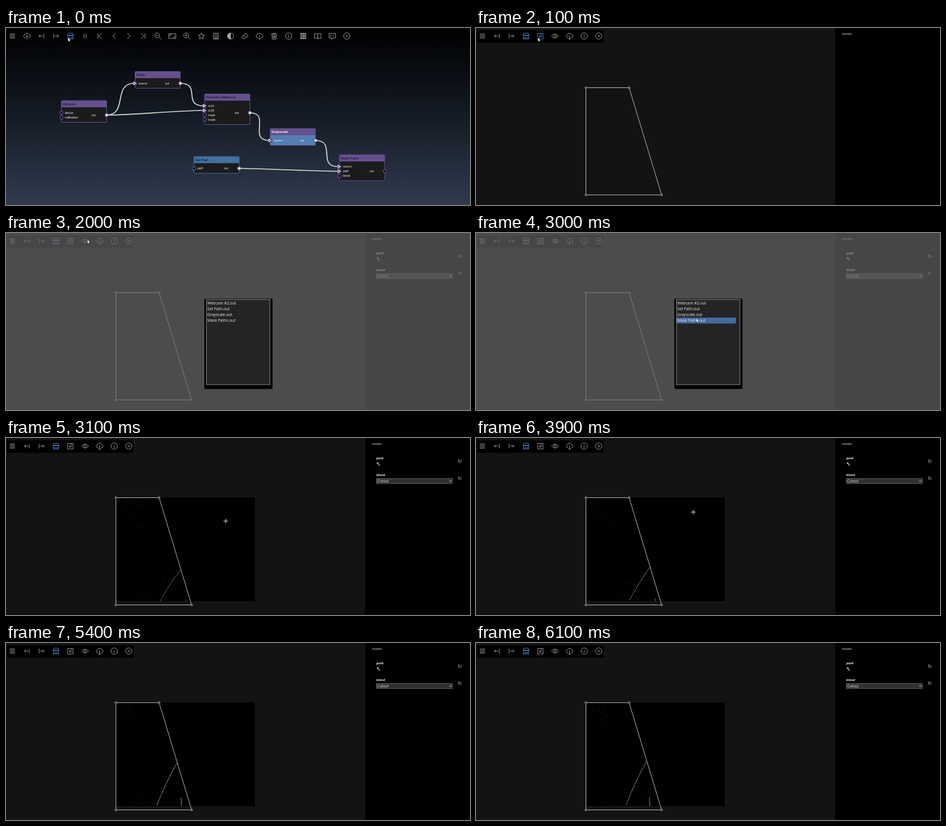
Animation, 800 px wide and 307 px high, one loop 6200 ms. Source, as an HTML page:

```html
<!DOCTYPE html>
<html lang="en">
<head>
<meta charset="utf-8">
<title>Node editor mask</title>
<style>
  html, body { margin: 0; width: 100%; height: 100%; overflow: hidden; background: #000; }
  svg { display: block; width: 800px; height: 307px; }
  text { font-family: "Open Sans", sans-serif; fill: #eee; }
  .node text { font-family: "Liberation Sans", Arial, sans-serif; font-size: 5px; fill: #f4f4f4; }
  .node .title { font-size: 6px; fill: #0c0a12; }
  .node .picked { fill: #fff; font-weight: bold; }
  .icon { fill: none; stroke: #a8a8a8; stroke-width: .9; stroke-linejoin: round; }
  .icon.on { stroke: #5f8fd8; }
  .label { font-size: 5.6px; font-weight: bold; font-style: italic; }
  .list text { font-size: 6.8px; }
</style>
</head>
<body>
<svg id="stage" viewBox="0 0 800 307"></svg>
<script>
const LOOP = 6200, STEP = 100;
const OPEN = 100, PANEL = 200, DIALOG = 2000, PICK = 2900, PREVIEW = 3100;
const PURPLE = '#65508f', BLUE = '#41709f';

const circle = r => `M${-r} 0a${r} ${r} 0 1 0 ${2 * r} 0a${r} ${r} 0 1 0 ${-2 * r} 0z`;
const cloud = 'M-2.5 3H-3.5A2.6 2.6 0 0 1 -4 -2A4 4 0 0 1 3.6 -2.2A2.7 2.7 0 0 1 4 3H2.5';
const glass = 'M2.2 1.8L6 5.5M3-1.2a4.2 4.2 0 1 0 -8.4 0a4.2 4.2 0 1 0 8.4 0z';

const icons = {
  menu: 'M-4.5-3.6H4.5M-4.5-1.2H4.5M-4.5 1.2H4.5M-4.5 3.6H4.5',
  upload: cloud + 'M0 6V-1M-2 1L0-1L2 1',
  download: cloud + 'M0-1V6M-2 4L0 6L2 4',
  input: 'M4-4V4M2 0H-4.5M-2-2.3L-4.5 0L-2 2.3',
  output: 'M-4-4V4M-2 0H4.5M2-2.3L4.5 0L2 2.3',
  store: 'M-3.5-5H3.5L5.3-1.4H-5.3zM-5.3-1.4q1.3 2.4 2.65 0q1.3 2.4 2.65 0q1.3 2.4 2.65 0q1.3 2.4 2.65 0M-4.5 .5V5H4.5V.5M-4.5 3H4.5',
  edit: 'M2-4.5H-5V5H4.5V-1M-2 2L-1.3-.5L4-5.3L5.5-3.8L.4 1.4zM-1.3-.5L.4 1.4',
  eye: 'M-6 0Q0-7 6 0Q0 7-6 0z' + circle(2),
  pause: 'M-1.8-4V4M1.8-4V4',
  first: 'M-3-4.5V4.5M3.5-4.5L-1 0L3.5 4.5',
  prev: 'M2.3-4.8L-2.5 0L2.3 4.8',
  next: 'M-2.3-4.8L2.5 0L-2.3 4.8',
  last: 'M3-4.5V4.5M-3.5-4.5L1 0L-3.5 4.5',
  zoomOut: glass + 'M-3.4-1.2H1',
  ratio: 'M-6-4.2H6V4.2H-6zM-4 0V-2.5H-1.5M4 0V2.5H1.5',
  zoomIn: glass + 'M-3.4-1.2H1M-1.2-3.4V1',
  star: 'M0-5.5L1.6-1.8L5.6-1.6L2.5 1L3.5 5L0 2.8L-3.5 5L-2.5 1L-5.6-1.6L-1.6-1.8z',
  calc: 'M-4-5H4V5.2H-4zM-2.5-3H2.5M-2.5 0H-1M-.7 0H.7M1 0H2.5M-2.5 2H-1M-.7 2H.7M1 2H2.5M-2.5 3.8H2.5',
  contrast: circle(5.3) + 'M0-5V5',
  eraser: 'M-5.5 1L1-4.5L5.5-.5L-.5 4.5H-3.5zM-2.5-1.5L2 2.5',
  trash: 'M-5-3.4H5M-1.8-3.4V-5H1.8V-3.4M-3.8-3.4L-3.2 5.3H3.2L3.8-3.4M-1.5-1.5V3.5M0-1.5V3.5M1.5-1.5V3.5',
  info: circle(5.5) + 'M0-.8V3M0-3V-2',
  grid: 'M-5-3.7H-2M-1.5-3.7H1.5M2-3.7H5M-5 0H-2M-1.5 0H1.5M2 0H5M-5 3.7H-2M-1.5 3.7H1.5M2 3.7H5',
  book: 'M0-3.5Q-3-5-5.7-4V4Q-3 3.2 0 4.7Q3 3.2 5.7 4V-4Q3-5 0-3.5V4.7',
  quote: 'M-5.5-4.5H5.5V3H1.5L-1 5.5V3H-5.5zM-2.4-2.3V0L-3.2 1M1.6-2.3V0L.8 1',
  close: circle(5.5) + 'M-2.3-2.3L2.3 2.3M2.3-2.3L-2.3 2.3'
};

const toolbar = names => names.split(' ').map((name, i) =>
  `<path class="icon" data-name="${name}" transform="translate(${11 + i * 25.07} 14)" d="${icons[name]}"` +
  (name === 'grid' ? ' style="stroke-width:2.6"' : '') + '/>' +
  (name === 'contrast' ? `<path fill="#a8a8a8" d="M${11 + i * 25.07} 8.7a5.3 5.3 0 0 0 0 10.6z"/>` : '')
).join('');

const text = (x, y, s, attrs = '') => `<text x="${x}" y="${y}" ${attrs}>${s}</text>`;

// Inputs prefixed with ">" are wired.
function node({ x, y, h, title, ins, outY, wired = true, color = PURPLE, picked }) {
  const port = (px, py) =>
    `<circle cx="${px}" cy="${py}" r="2.8" fill="#101014" stroke="${color}" stroke-width="1.1"/>`;
  const inputs = ins.map(([label, dy]) => {
    const on = label[0] === '>', py = y + dy;
    return port(x, py) +
      (on ? `<path d="M${x - 3} ${py - 2.6}L${x + 1.2} ${py}L${x - 3} ${py + 2.6}" fill="none" stroke="#eee" stroke-width="1.3"/>` : '') +
      text(x + 6, py + 1.8, on ? label.slice(1) : label);
  }).join('');
  return `<g class="node">
    <rect x="${x}" y="${y}" width="78" height="${h}" rx="1.5" fill="${picked ? '#527fb0' : '#1b1b1c'}" stroke="${color}"/>
    <rect x="${x}" y="${y}" width="78" height="11.5" fill="${color}"/>
    ${text(x + 2, y + 7.8, title, `class="title ${picked ? 'picked' : ''}"`)}
    ${inputs}
    ${text(x + 52, y + outY + 1.8, 'out')}
    ${port(x + 78, y + outY)}
    ${wired ? `<circle cx="${x + 78}" cy="${y + outY}" r="2.2" fill="#e8e8f0"/>` : ''}
  </g>`;
}

const nodes = [
  { x: 95.5, y: 126, h: 37.5, title: 'Webcam', ins: [['device', 21], ['calibration', 29]], outY: 25 },
  { x: 222.5, y: 75.5, h: 29, title: 'Delay', ins: [['>source', 20.5]], outY: 20.5 },
  { x: 342.5, y: 114.5, h: 53, title: 'Absolute Difference',
    ins: [['>srcA', 20.5], ['>srcB', 28.5], ['mask', 36.5], ['mode', 44.5]], outY: 32.5 },
  { x: 455.5, y: 174.5, h: 29, title: 'Grayscale', ins: [['>source', 20.5]], outY: 20.5, picked: true },
  { x: 324, y: 223, h: 29, title: 'Set Path', ins: [['path', 20.5]], outY: 20.5, color: BLUE },
  { x: 575, y: 220, h: 45, title: 'Mask Paths',
    ins: [['>source', 20.5], ['>path', 28.5], ['blend', 36.5]], outY: 28.5, wired: false }
];

const wire = ([x1, y1, x2, y2]) =>
  `<path d="M${x1} ${y1}C${x1 + 38} ${y1} ${x2 - 38} ${y2} ${x2} ${y2}"/>`;
const wires = [
  [173, 151, 221, 96], [173, 151, 341, 143], [300, 96, 341, 135],
  [420, 147, 454, 195], [533, 195, 573, 240.5], [402, 243.5, 573, 248.5]
];

const corners = [[189.5, 103.5], [264, 103.5], [320, 289.5], [189.5, 289.5]];
const points = corners.join(' ');
const reset = y =>
  `<path d="M781 ${y - 1.6}A2.3 2.3 0 1 0 783.6 ${y - 1.7}M780.3 ${y - 2.6}L781 ${y - 1.2}L782.6 ${y - 1.7}" fill="none" stroke="#ddd" stroke-width=".8"/>`;
const choices = ['Webcam #2.out', 'Set Path.out', 'Grayscale.out', 'Mask Paths.out'];

const stage = document.getElementById('stage');
stage.innerHTML = `
<defs>
  <linearGradient id="sky" x2="0" y2="1">
    <stop offset=".04" stop-color="#010203"/><stop offset=".5" stop-color="#151b25"/><stop offset="1" stop-color="#2f3b4e"/>
  </linearGradient>
  <clipPath id="mask"><polygon points="${points}"/></clipPath>
</defs>
<g id="graph">
  <rect width="800" height="307" fill="url(#sky)"/>
  <g id="graphBar">${toolbar('menu upload input output store pause first prev next last zoomOut ratio zoomIn star calc contrast eraser download trash info grid book quote close')}</g>
  ${nodes.map(node).join('')}
  <g fill="none" stroke="#dcdcdc" stroke-width="1.7">${wires.map(wire).join('')}</g>
</g>
<g id="editor">
  <rect width="800" height="307" fill="#131313"/>
  <g id="preview">
    <rect x="190" y="103" width="239" height="180" fill="#000"/>
    <g clip-path="url(#mask)" fill="none">
      <path id="grain" stroke="#10131b"/>
      <path id="edge" stroke-width="1.1"/>
      <path id="stub" stroke-width="1.4"/>
    </g>
  </g>
  <polygon points="${points}" fill="none" stroke="#b8b8b8"/>
  ${corners.map(([x, y]) => `<circle cx="${x}" cy="${y}" r="1.7" fill="#333" stroke="#b0b0b0" stroke-width=".9"/>`).join('')}
  <rect x="2" y="4" width="218" height="21.5" fill="#000"/>
  <g id="editBar">${toolbar('menu input output store edit eye download info close')}</g>
  <rect x="619.5" width="180.5" height="307" fill="#000"/>
  ${text(631, 11.5, 'masks', 'font-size="5.7"')}
  <g id="panel">
    ${text(638.5, 36.5, 'path', 'class="label"')}
    ${text(638.5, 66, 'blend', 'class="label"')}
    <path d="M639 43H642V47H645M640.5 43V45" fill="none" stroke="#ddd"/>
    ${reset(40)}${reset(69.5)}
    <rect x="638.5" y="70.5" width="131" height="8.5" fill="#303030" stroke="#777" stroke-width=".8"/>
    ${text(640, 77, 'Cutout', 'font-size="6.2"')}
    <path d="M764.3 73.8L766 75.6L767.7 73.8" fill="none" stroke="#eee"/>
  </g>
</g>
<g id="dialog" class="list">
  <rect width="800" height="307" fill="#646464" fill-opacity=".7"/>
  <rect x="342" y="114" width="117.5" height="156.5" rx="1.5" fill="#000"/>
  <rect x="345.5" y="115.5" width="109.5" height="147.5" fill="#242424" stroke="#999" stroke-width=".9"/>
  <rect id="choice" x="346" y="146.7" width="102" height="10.2" fill="#456a9f"/>
  ${choices.map((s, i) => text(347, 123.6 + i * 10.2, s)).join('')}
</g>
<path id="arrow" d="M0 0V6.2L1.4 5L2.4 7.2L3.4 6.8L2.5 4.6H4.3z" fill="#fff" stroke="#111" stroke-width=".3"/>
<path id="cross" d="M-4 0H4M0-4V4" stroke="#ddd" fill="none"/>`;

const el = {};
stage.querySelectorAll('[id]').forEach(e => el[e.id] = e);

// Rows are time followed by values.
const pointer = [
  [0, 107, 17], [100, 107, 17], [700, 158, 20], [1000, 168, 24], [1200, 160, 16],
  [1400, 160, 16], [1900, 140.5, 11.5], [2000, 140.5, 11.5], [2100, 152, 24],
  [2800, 380, 148], [3000, 380, 148], [3500, 374.5, 128.5], [5000, 374.5, 128.5], [5300, 384, -8]
];
// Edge top, middle and bottom, stub x and top, brightness.
const figure = [
  [3100, 301, 229, 284, 249, 266, 283, 310, 280, 85],
  [3900, 299.5, 224, 283, 248, 264, 282, 309, 278, 100],
  [5400, 295, 208, 276, 241, 260, 282, 302, 268, 125],
  [6100, 294, 206, 274, 240, 259, 281, 299, 268, 115]
];

function sample(rows, t) {
  const i = rows.findIndex(r => r[0] > t);
  if (i < 0) return rows[rows.length - 1].slice(1);
  if (i === 0) return rows[0].slice(1);
  const a = rows[i - 1], b = rows[i], k = (t - a[0]) / (b[0] - a[0]);
  return a.slice(1).map((v, n) => v + (b[n + 1] - v) * k);
}

function seeded(s) {
  return () => {
    s = Math.imul(s ^ s >>> 15, 0x2c1b3c6d) + 0x9e3779b9 | 0;
    return ((s ^ s >>> 13) >>> 0) / 4294967296;
  };
}

const show = (e, on) => e.style.display = on ? '' : 'none';

function drawFigure(t) {
  const rnd = seeded(t + 7);
  let dots = '';
  for (let i = 0; i < 130; i++) {
    const upper = i < 60, u = rnd(), v = rnd();
    const x = upper ? 196 + 42 * u : 220 + 80 * u;
    const y = upper ? 108 + 28 * v + 28 * u * v : 283 - (15 + 45 * u) * v;
    dots += `M${x.toFixed(1)} ${y.toFixed(1)}h1.6`;
  }
  el.grain.setAttribute('d', dots);

  const [x1, y1, x2, y2, x3, y3, sx, sy, tone] = sample(figure, t);
  const gray = Math.round(tone);
  el.edge.setAttribute('d', `M${x1} ${y1}Q${x2} ${y2} ${x3} ${y3}`);
  el.edge.setAttribute('stroke', `rgb(${gray},${gray},${gray})`);
  el.edge.setAttribute('stroke-dasharray', `${5 + 7 * rnd()} .7 3 .5`);
  el.stub.setAttribute('d', `M${sx} ${sy}L${sx + .6} 283`);
  el.stub.setAttribute('stroke', `rgb(${gray - 15},${gray - 15},${gray - 15})`);
}

function draw(t) {
  const editing = t >= OPEN, preview = t >= PREVIEW;
  const [x, y] = sample(pointer, t);
  show(el.graph, !editing);
  show(el.editor, editing);
  show(el.panel, t >= PANEL);
  show(el.dialog, t >= DIALOG && !preview);
  show(el.choice, t >= PICK);
  show(el.preview, preview);
  show(el.arrow, !preview);
  show(el.cross, preview);
  (preview ? el.cross : el.arrow).setAttribute('transform', `translate(${x} ${y})`);

  const bar = editing ? el.editBar : el.graphBar;
  const hover = y < 25 && !preview ? Math.round((x - 11) / 25.07) : -1;
  bar.querySelectorAll('.icon').forEach((icon, i) =>
    icon.classList.toggle('on', i === hover || editing && icon.dataset.name === 'store'));
  if (preview) drawFigure(t);
}

const start = performance.now();
let shown = -1;
function tick() {
  const t = Math.floor((performance.now() - start) % LOOP / STEP) * STEP;
  if (t !== shown) draw(shown = t);
  requestAnimationFrame(tick);
}
tick();
</script>
</body>
</html>
```
